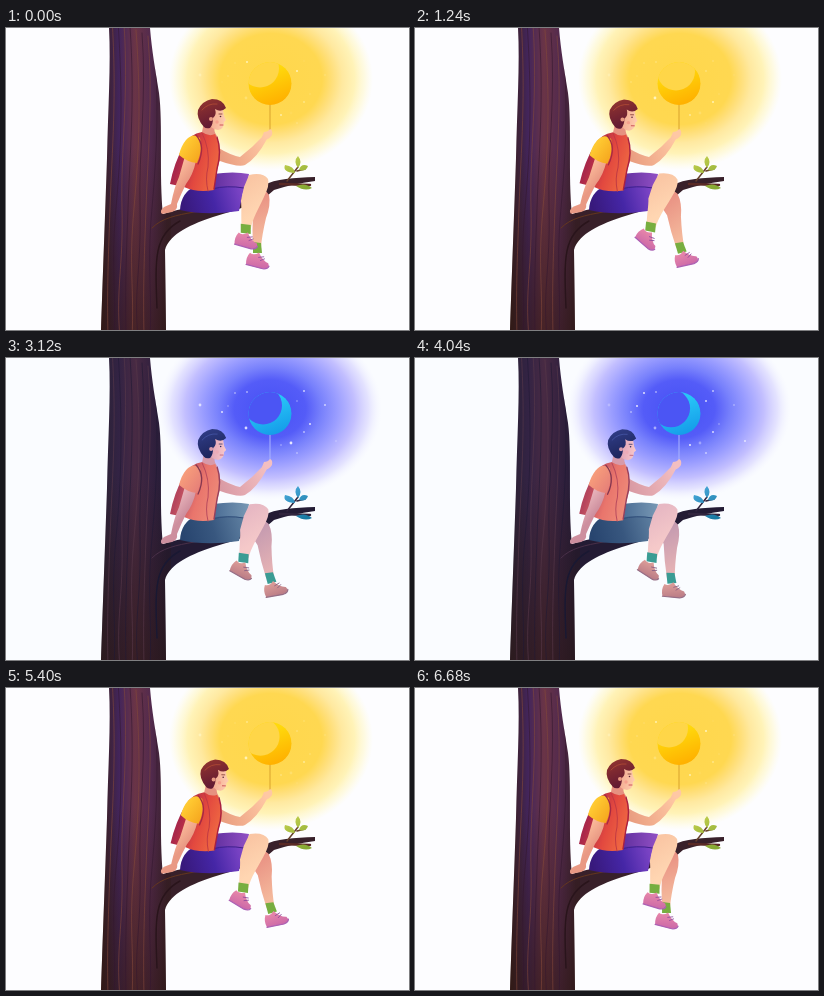
These frames come from a looping animation (403 by 302 pixels, 6720 ms). An HTML page with a canvas:

```html
<!DOCTYPE html>
<html lang="en">
<head>
<meta charset="utf-8">
<title>Sitting under the sun and moon</title>
<style>
html, body { margin: 0; width: 100%; height: 100%; overflow: hidden; background: #fdfdff; }
canvas { display: block; }
</style>
</head>
<body>
<canvas id="stage" width="403" height="302"></canvas>
<script>
const ctx = document.getElementById('stage').getContext('2d');
const LOOP = 6720, TAU = Math.PI * 2;
let night = 0;

const clamp = v => Math.max(0, Math.min(1, v));
const ease = v => { v = clamp(v); return v * v * (3 - 2 * v); };
const rgb = h => [1, 3, 5].map(i => parseInt(h.slice(i, i + 2), 16));

// Blend a day colour into its night colour
function mix(day, dark) {
  const a = rgb(day), b = rgb(dark);
  return `rgb(${a.map((v, i) => Math.round(v + (b[i] - v) * night))})`;
}

function gradient(x0, y0, x1, y1, ...pairs) {
  const g = ctx.createLinearGradient(x0, y0, x1, y1);
  pairs.forEach((p, i) => g.addColorStop(i / (pairs.length - 1), mix(...p)));
  return g;
}

function fill(d, paint) {
  ctx.fillStyle = paint;
  ctx.fill(new Path2D(d));
}

function line(d, paint, width = 1) {
  ctx.strokeStyle = paint;
  ctx.lineWidth = width;
  ctx.lineCap = ctx.lineJoin = 'round';
  ctx.stroke(new Path2D(d));
}

function dot(x, y, r, paint) {
  ctx.fillStyle = paint;
  ctx.beginPath();
  ctx.arc(x, y, r, 0, TAU);
  ctx.fill();
}

function turned(x, y, angle, draw) {
  ctx.save();
  ctx.translate(x, y);
  ctx.rotate(angle);
  ctx.translate(-x, -y);
  draw();
  ctx.restore();
}

function halo(x, y, rx, ry, alpha, stops) {
  ctx.save();
  ctx.globalAlpha = alpha;
  ctx.translate(x, y);
  ctx.scale(rx, ry);
  const g = ctx.createRadialGradient(0, 0, 0, 0, 0, 1);
  stops.forEach(([at, color]) => g.addColorStop(at, color));
  dot(0, 0, 1, g);
  ctx.restore();
}

// Bite offset of the crescent: time, dx, dy
const phases = [
  [0, -10, -15], [1240, -3, -12], [2080, -8, -7], [3120, -7, -8],
  [4200, -8, -5], [4920, -9, -1], [6000, -10, -15], [LOOP, -10, -15]
];

function bite(t) {
  const i = phases.findIndex(p => p[0] > t), a = phases[i - 1], b = phases[i];
  const k = ease((t - a[0]) / (b[0] - a[0]));
  return [a[1] + (b[1] - a[1]) * k, a[2] + (b[2] - a[2]) * k];
}

const stars = [
  [194, 47], [222, 48], [216, 54], [241, 34], [229, 35], [257, 54], [291, 43], [298, 33],
  [319, 47], [275, 87], [285, 85], [291, 95], [298, 74], [304, 66], [330, 83], [240, 70]
];

function sky(t) {
  ctx.fillStyle = mix('#fdfdff', '#fafcff');
  ctx.fillRect(0, 0, 403, 302);
  halo(265, 51, 102, 91, 1 - night, [
    [0, '#ffd74c'], [.5, '#ffd851'], [.6, '#ffdf7a'], [.7, '#ffe9a0'],
    [.82, '#fff3b8'], [.92, '#fff9d4aa'], [1, '#fffbe000']
  ]);
  halo(264, 51, 112, 91, night, [
    [0, '#4650f4'], [.32, '#545cf8'], [.46, '#7881fc'], [.6, '#9a9dff'],
    [.76, '#c3bfff'], [.88, '#dedcffcc'], [1, '#f3f4ff00']
  ]);
  stars.forEach(([x, y], i) => {
    const shine = .65 + .35 * Math.sin(TAU * t / 2240 + i * 2.4);
    ctx.globalAlpha = shine * (i % 3 ? .25 + .75 * night : 1);
    dot(x, y, i % 5 ? 1 : 1.4, mix('#fff4bd', '#e9e9ff'));
  });
  ctx.globalAlpha = 1;

  line('M264 76V104', mix('#d9a22c', '#a9b4ff'), 1);
  const [dx, dy] = bite(t);
  ctx.save();
  ctx.beginPath();
  ctx.arc(264, 55.5, 21.5, 0, TAU);
  ctx.clip();
  dot(264, 55.5, 22, gradient(258, 44, 270, 76, ['#ffd90c', '#28c6f7'], ['#ffb000', '#159de9']));
  dot(264 + dx, 55.5 + dy, 19, mix('#ffd648', '#4b55f4'));
  ctx.restore();
}

function tree() {
  const trunk = 'M103 0C105 36 102 82 101 130C99 190 97 240 95 302H160L159 222'
    + 'C162 209 179 198 207 189C234 181 255 175 268 162Q286 156 309 153L309 149'
    + 'C288 150 270 150 257 158C237 173 188 176 157 186C153 150 157 95 153 65C149 40 146 24 144 0Z';
  fill(trunk, gradient(97, 0, 161, 0, ['#3a2024', '#2c2236'], ['#43255b', '#332344'],
    ['#6a3446', '#482a43'], ['#522a4e', '#33213f'], ['#38202a', '#231b34']));
  ctx.save();
  ctx.clip(new Path2D(trunk));

  // Shade gathers towards the roots and the branch joint
  const shade = ctx.createLinearGradient(145, 120, 125, 302);
  shade.addColorStop(0, '#2c160e00');
  shade.addColorStop(1, '#2c160e90');
  ctx.fillStyle = shade;
  ctx.fillRect(90, 100, 75, 202);
  for (let i = 0; i < 8; i++) {
    const x = 106 + i * 6, s = 4 * Math.sin(i * 2.1);
    line(`M${x} ${-10 + i * 3}C${x + 5} 70 ${x + s} 120 ${x - 2} 180S${x - 5 + s} 260 ${x - 4} 310`,
      i % 2 ? mix('#34182f', '#211a34') : mix('#84493a', '#5a394b'), .6);
  }
  line('M146 200C165 180 207 188 246 168', mix('#64361f', '#493048'), 1);
  line('M151 280C149 230 148 207 174 193', mix('#29141b', '#191832'), 1.5);
  ctx.restore();
  line('M274 156L304 157', mix('#5a2a25', '#30243d'), 2.4);
  line('M281 153L292 139M291 143L299 141', mix('#66402b', '#30243d'), 1.5);
  const leaf = gradient(281, 130, 300, 160, ['#c2cf4c', '#48a8db'], ['#86a934', '#197aa2']);
  fill('M289 145Q276 144 279 137Q288 138 289 145ZM292 140Q287 133 292 128Q297 134 292 140'
    + 'ZM293 142Q295 135 302 138Q300 144 293 142ZM290 158Q299 154 306 160Q299 164 290 158Z', leaf);
}

// The foot tilts about its ankle
function shoe(x, y, tilt) {
  turned(x - 4, y - 7, tilt, () => {
    fill(`M${x - 8} ${y - 7}Q${x - 4} ${y - 4} ${x + 1} ${y - 8}Q${x + 5} ${y} ${x + 11} ${y + 2}`
      + `Q${x + 14} ${y + 8} ${x + 5} ${y + 8}L${x - 11} ${y + 5}Q${x - 12} ${y - 2} ${x - 8} ${y - 7}Z`,
      gradient(x, y - 8, x, y + 8, ['#ea8aa9', '#dfa09a'], ['#cb68a8', '#b97b85']));
    line(`M${x - 11} ${y + 5}L${x + 6} ${y + 8}Q${x + 11} ${y + 8} ${x + 12} ${y + 5}`,
      mix('#aa60b4', '#956e86'), 1.2);
    line(`M${x + 1} ${y - 3}L${x + 6} ${y - 4}M${x + 3} ${y}L${x + 7} ${y - 2}`,
      mix('#8e4a9d', '#855e83'), .8);
  });
}

function legs(t) {
  const swing = (1 - Math.cos(TAU * t / 2240)) / 2;
  const lag = (1 - Math.cos(TAU * (t / 2240 - .12))) / 2;
  const sock = mix('#77ae40', '#3a9c94');

  turned(258, 168, -.285 * swing, () => {
    fill('M239 160Q256 156 263 167Q265 177 260 190Q256 207 255 219L247 219Q246 202 247 185Z',
      gradient(246, 170, 262, 215, ['#e99183', '#c49ab0'], ['#f6bfa0', '#e9b5b5']));
    fill('M247 214L255 215L256 225L247 225Z', sock);
    shoe(252, 232, .08 - .2 * swing);
  });

  fill('M200 160L207 146Q228 143 243 146L240 165L206 166Z',
    gradient(206, 150, 243, 150, ['#5f2e9d', '#486a93'], ['#9150c4', '#7898b4']));
  fill('M174 182Q175 164 190 158L206 160Q222 156 238 160L233 183Q200 188 174 182Z',
    gradient(178, 180, 236, 163, ['#38197c', '#28456f'], ['#4526a6', '#38577f'], ['#7d45c6', '#5b7c9e']));
  line('M206 161Q221 157 238 160', mix('#41208a', '#304e7b'), 1);

  turned(258, 156, -.01 + .115 * lag, () => {
    fill('M243 147Q257 144 262 151Q264 157 258 169C252 182 247 190 245 201L236 200'
      + 'C235 190 236 180 235 173L238 159Z',
      gradient(239, 155, 257, 181, ['#fac6a4', '#e7b8c3'], ['#ffd6b2', '#f5c9c9']));
    fill('M235 196L245 197L245 206L235 205Z', sock);
    shoe(241, 212, .04 + .42 * lag);
  });
}

function head() {
  fill('M198 94L209 97Q207 103 211 108Q204 112 196 104Z', mix('#e69180', '#d79aaa'));
  fill('M203 79Q214 74 217 82L218 88L220 92L218 94Q218 101 212 102Q203 101 202 91Z',
    gradient(204, 88, 220, 90, ['#f2a98e', '#dfa0b4'], ['#ffcdb0', '#f8c8cc']));
  fill('M198 99Q190 90 192 82Q196 73 206 71Q217 71 220 80Q215 85 209 81Q211 87 207 90'
    + 'Q207 97 204 100Q200 101 198 99Z',
    gradient(197, 72, 208, 100, ['#92342f', '#303d87'], ['#5d1733', '#1c2359']));
  line('M196 82Q202 75 211 76', mix('#b24c35', '#4656a6'), .8);
  dot(205, 91, 2, mix('#e99a82', '#d99bad'));
  line('M213 86L216 86', mix('#7c3531', '#383868'), .8);
  dot(214.5, 88.5, .8, mix('#552438', '#302d5f'));
  line('M214 97L217 97', mix('#c94b50', '#bf6680'), .9);
  dot(211, 94, 1.7, mix('#f6a08d', '#edabb7'));
}

function person(t) {
  const lean = .035 * (1 - Math.cos(TAU * t / 3360)) / 2;
  legs(t);

  // Raised arm follows the shoulder while its hand stays on the string
  const x = 211 + 55 * lean, y = 123 + 21 * lean;
  const skin = gradient(213, 125, 260, 108, ['#e99d80', '#d99aa4'], ['#ffc8a4', '#f3bfc1']);
  fill(`M${x} ${y - 4}Q224 127 234 129Q246 120 257 108L261 111Q251 130 239 137`
    + `Q233 140 ${x} ${y + 9}Z`, skin);
  fill('M256 109L258 104Q262 104 264 101Q267 102 266 107Q263 112 259 111Z', skin);

  turned(190, 175, lean, () => {
    head();
    fill('M196 104Q203 109 209 106Q215 116 214 131Q210 145 208 162Q191 165 178 159'
      + 'L164 156Q168 135 178 117Q184 106 196 104Z',
      gradient(175, 125, 214, 137, ['#a9274a', '#b5455d'], ['#e2483f', '#e9756c'], ['#f06a42', '#ef8b79']));
    line('M196 105Q204 121 202 139Q199 151 202 163', mix('#c23a43', '#b94b5e'), 1);
    line('M211 109Q216 123 211 141L208 161', mix('#a82042', '#96405d'), 1.4);
  });

  turned(165, 183, lean, () => {
    fill('M179 128L190 133Q187 147 180 156Q175 166 171 176Q172 182 166 184L156 186'
      + 'Q153 183 158 179L165 176Q168 160 173 149Z',
      gradient(168, 139, 183, 151, ['#ffc29f', '#eebcc1'], ['#e99984', '#cd8f9e']));
    fill('M180 112Q187 104 194 110Q197 122 191 135Q181 134 173 127Q175 118 180 112Z',
      gradient(178, 117, 196, 129, ['#ffca32', '#f69b7b'], ['#f5a51e', '#e57e78']));
    line('M190 107Q200 118 192 136', mix('#a52a43', '#843750'), 1.3);
  });
}

function frame(now) {
  const t = now % LOOP;
  night = ease((t - 1480) / 420) * (1 - ease((t - 4960) / 440));
  sky(t);
  tree();
  person(t);
  requestAnimationFrame(frame);
}
frame(0);
</script>
</body>
</html>
```
